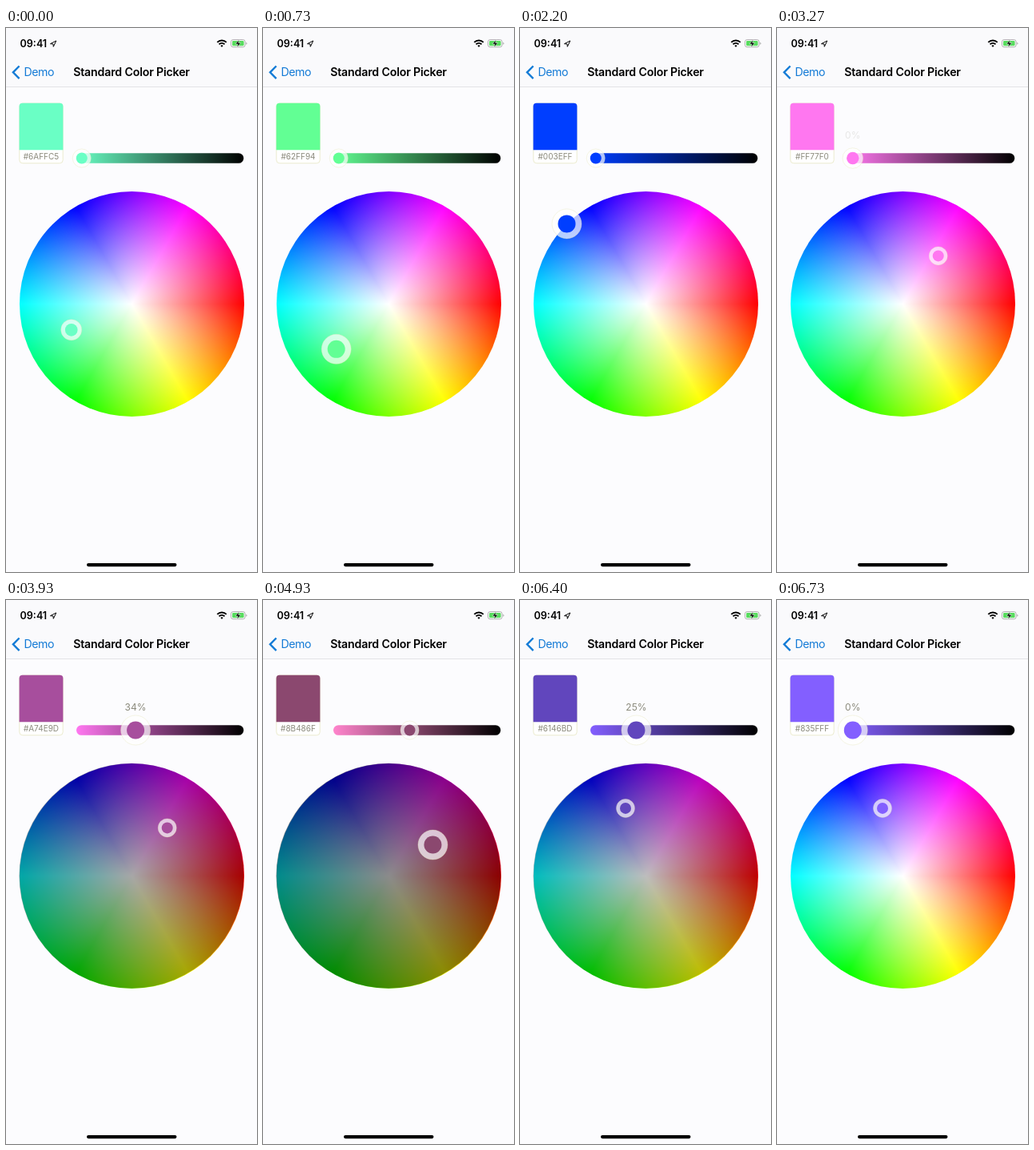
Animation, 314 px wide and 679 px high, one loop 6.79 s. Source, as an HTML page:

```html
<!DOCTYPE html>
<html lang="en">
<head>
<meta charset="utf-8">
<title>Color picker</title>
<style>
  html, body { margin: 0; width: 100%; height: 100%; overflow: hidden; background: #fcfcfe; }
  #wheel, svg { position: absolute; }
  #wheel {
    left: 16.5px; top: 203.8px; width: 281px; height: 281px; border-radius: 50%;
    background:
      radial-gradient(closest-side, #fff, rgba(255, 255, 255, 0)),
      conic-gradient(from 90deg, #f00, #ff0, #0f0, #0ff, #00f, #f0f, #f00);
  }
  svg { left: 0; top: 0; display: block; }
  text { font-family: Inter, "Liberation Sans", sans-serif; }
  .note { fill: #8b8a7c; text-anchor: middle; }
  .halo { fill: #fff; fill-opacity: .7; stroke: #e2e2b4; stroke-opacity: .6; stroke-width: .6; }
</style>
</head>
<body>
<div id="wheel"></div>
<svg width="314" height="679" viewBox="0 0 314 679">
  <defs>
    <linearGradient id="fade">
      <stop id="bright" offset="0"/>
      <stop offset="1" stop-color="#000"/>
    </linearGradient>
  </defs>

  <!-- status bar and navigation -->
  <rect width="314" height="73" fill="#fafafc"/>
  <path d="M0 73.5H314" stroke="#dedee0" stroke-width=".8"/>
  <text x="17.5" y="24" font-size="12.6" font-weight="600">09:41</text>
  <path d="M55.5 19.7 62.8 16 59.3 23.3 59 20Z" fill="none" stroke="#000" stroke-width="1" stroke-linejoin="round"/>
  <g fill="none" stroke="#000" stroke-width="2">
    <path d="M264.3 17.9a8 8 0 0 1 11.4 0M266.5 20.4a5 5 0 0 1 7 0"/>
    <path d="M268.4 21.9 270 24.1 271.6 21.9Q270 20.7 268.4 21.9Z" fill="#000" stroke="none"/>
  </g>
  <rect x="281.5" y="14.6" width="17.6" height="9.2" rx="2.6" fill="#fff" stroke="#a5a5a5" stroke-width=".9"/>
  <rect x="283" y="16.1" width="14.6" height="6.2" rx="1.3" fill="#57dc5e"/>
  <path d="M300.3 17.7v3q1.1-.4 1.1-1.5t-1.1-1.5Z" fill="#a5a5a5"/>
  <path d="M291.7 14.6 287 20h2.9l-1 4.2 4.8-5.8h-3Z" fill="#000" stroke="#fff" stroke-width=".5"/>
  <path d="M16.6 47.5 8.9 55.3 16.6 63.1" fill="none" stroke="#147bd6" stroke-width="2.4"/>
  <text x="22.5" y="60.3" font-size="14.2" letter-spacing="-.5" fill="#147bd6">Demo</text>
  <text x="157" y="60.3" font-size="14.2" font-weight="600" letter-spacing="-.18" text-anchor="middle">Standard Color Picker</text>
  <rect x="101" y="668" width="112.5" height="4.2" rx="2.1"/>

  <!-- swatch -->
  <rect x="16.8" y="94" width="54.4" height="74.8" rx="4" fill="#fff" stroke="#e6e6c2" stroke-width=".8"/>
  <path id="swatch" d="M16.6 152.2V97.8a4 4 0 0 1 4-4H67.4a4 4 0 0 1 4 4V152.2Z"/>
  <text id="hex" class="note" x="44" y="164.2" font-size="10"></text>

  <!-- brightness slider -->
  <rect x="88" y="156.2" width="209.3" height="12.6" rx="6.3" fill="url(#fade)"/>
  <text id="percent" class="note" y="138" font-size="12"></text>
  <g id="thumb"><circle class="halo"/><circle/></g>

  <!-- wheel shade and knob -->
  <circle id="shade" cx="157" cy="344.3" r="140.5"/>
  <g id="knob"><circle class="halo"/><circle/></g>
</svg>

<script>
const $ = id => document.getElementById(id);
const LOOP = 6790, STEP = 200 / 3;
const CENTER = { x: 157, y: 344.3 }, RADIUS = 140.3;
const clamp = v => Math.min(1, Math.max(0, v));

// Wheel offset (in units of its radius) at which a colour lies.
function locate(hex) {
  const [r, g, b] = [1, 3, 5].map(i => parseInt(hex.slice(i, i + 2), 16));
  const max = Math.max(r, g, b), span = max - Math.min(r, g, b);
  const sector = max === r ? (g - b) / span
    : max === g ? 2 + (b - r) / span
    : 4 + (r - g) / span;
  const angle = sector * Math.PI / 3, sat = span / max;
  return [sat * Math.cos(angle), sat * Math.sin(angle)];
}

function hsv(h, s, v) {
  const channel = n => {
    const k = (n + h / 60) % 6;
    return v - v * s * clamp(Math.min(k, 4 - k));
  };
  return '#' + [5, 3, 1].map(n =>
    Math.round(channel(n) * 255).toString(16).padStart(2, '0')).join('').toUpperCase();
}

// Smooth curve through [step, value] keys that never overshoots them.
function curve(keys) {
  const slope = i => (keys[i + 1][1] - keys[i][1]) / (keys[i + 1][0] - keys[i][0]);
  const tangents = keys.map((_, i) => {
    if (i === 0 || i === keys.length - 1) return 0;
    const a = slope(i - 1), b = slope(i);
    return a * b <= 0 ? 0 : 2 * a * b / (a + b);
  });
  return n => {
    let i = 0;
    while (i < keys.length - 2 && n >= keys[i + 1][0]) i++;
    const [[n0, v0], [n1, v1]] = [keys[i], keys[i + 1]];
    const d = n1 - n0, u = clamp((n - n0) / d), w = 1 - u;
    return w * w * (1 + 2 * u) * v0 + u * u * (1 + 2 * w) * v1
      + d * u * w * (w * tangents[i] - u * tangents[i + 1]);
  };
}

const picks = [
  [0, '#6AFFC5'], [10, '#61FF96'], [20, '#71FF86'], [27, '#45EFFF'],
  [33, '#003EFF'], [39, '#571FFF'], [46, '#A74E9D'], [68, '#A74E9D'],
  [74, '#8B486F'], [81, '#D175FF'], [87, '#41358B'], [89, '#835FFF'], [102, '#835FFF']
].map(([n, hex]) => [n, locate(hex)]);
const pickX = curve(picks.map(([n, p]) => [n, p[0]]));
const pickY = curve(picks.map(([n, p]) => [n, p[1]]));
const darkness = curve([
  [0, 0], [49, 0], [59, 88], [65, 116], [92, 116], [100, 4], [101, 0], [102, 0]
].map(([n, v]) => [n, v / 255]));

// Fingers rest on a control between these steps.
const wheelTouches = [[-.6, 46], [68, 89]];
const sliderTouches = [[48.5, 65.5], [91, 110]];
const grip = (touches, n) => Math.max(...touches.map(([down, up]) =>
  clamp((n - down) / 2.8) * clamp(1 - (n - up) / 2.8)));

function placeKnob(group, x, y, size, color) {
  const [halo, dot] = group.children;
  group.setAttribute('transform', `translate(${x} ${y})`);
  halo.setAttribute('r', 11.5 + 7 * size);
  dot.setAttribute('r', 7 + 4 * size);
  dot.setAttribute('fill', color);
}

function draw(time) {
  const n = Math.floor((time % LOOP + 4) / STEP);
  let x = pickX(n), y = pickY(n);
  const reach = Math.max(1, Math.hypot(x, y));
  x /= reach;
  y /= reach;
  const dark = darkness(n);
  const hue = (Math.atan2(y, x) * 180 / Math.PI + 360) % 360, sat = Math.hypot(x, y);
  const color = hsv(hue, sat, 1 - dark);
  const thumbX = 94.8 + 195 * dark, hold = grip(sliderTouches, n);

  $('swatch').setAttribute('fill', color);
  $('hex').textContent = color;
  $('bright').setAttribute('stop-color', hsv(hue, sat, 1));
  $('shade').setAttribute('opacity', dark);
  $('percent').textContent = Math.floor(dark * 100 + 1e-6) + '%';
  $('percent').setAttribute('x', thumbX);
  $('percent').setAttribute('opacity', hold);
  placeKnob($('thumb'), thumbX, 162.5, hold, color);
  placeKnob($('knob'), CENTER.x + RADIUS * x, CENTER.y + RADIUS * y, grip(wheelTouches, n), color);
}

const start = performance.now();
function tick() {
  draw(performance.now() - start);
  requestAnimationFrame(tick);
}
tick();
</script>
</body>
</html>
```
